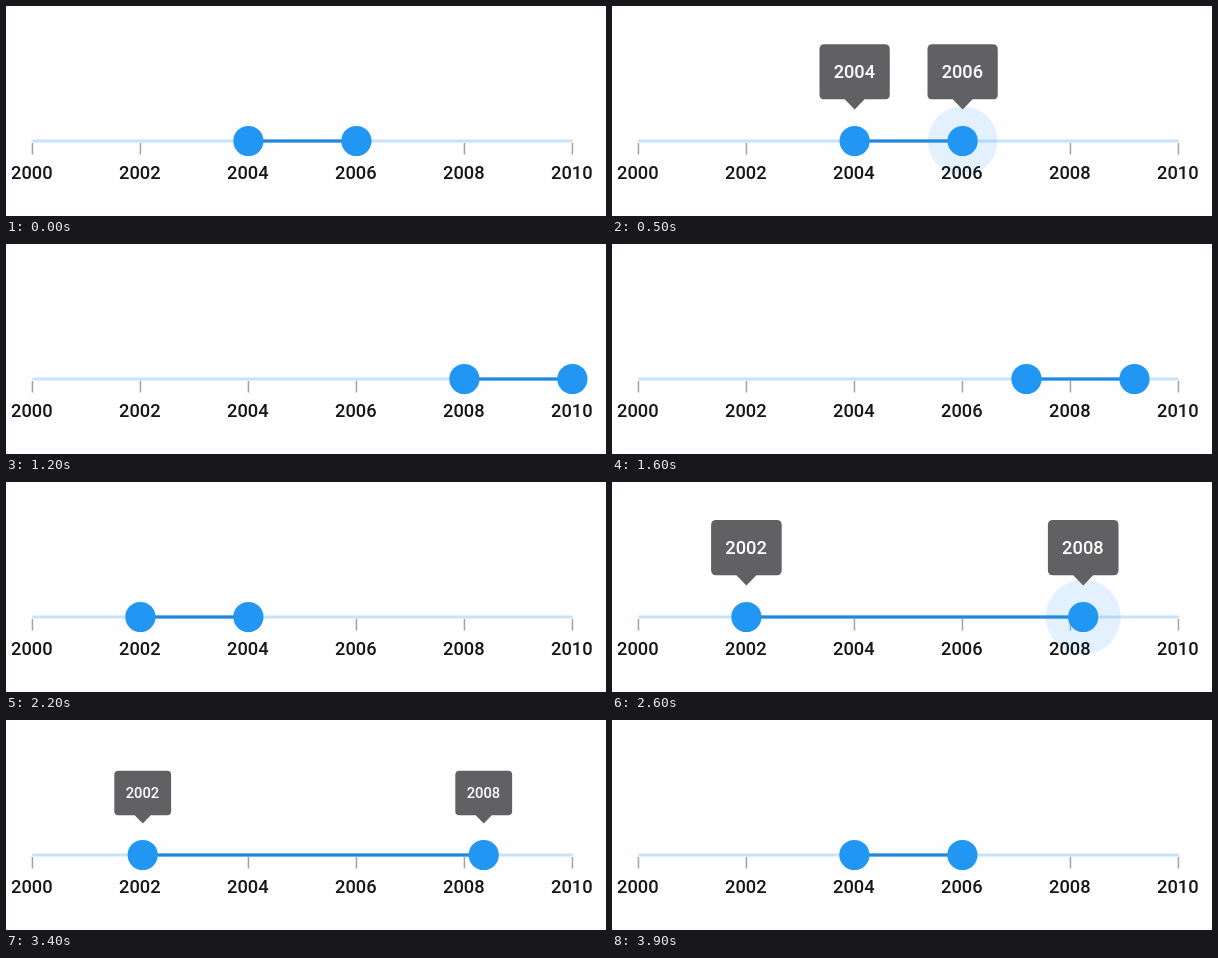
These frames come from a looping animation (600 px wide and 210 px high, 4 s). An HTML page:

```html
<!DOCTYPE html>
<html lang="en">
<head>
<meta charset="utf-8">
<title>Range slider</title>
<style>
  html, body { margin: 0; width: 100%; height: 100%; overflow: hidden; background: #fefdff; }
  svg { display: block; width: 600px; height: 210px; }
  text { font: 500 18.3px Roboto, sans-serif; text-anchor: middle; fill: #161616; }
  .tooltip path { fill: #616062; }
  .tooltip text { fill: #fff; }
  .thumb { fill: #2196f3; }
</style>
</head>
<body>
<svg viewBox="0 0 600 210">
  <rect x="26" y="133.4" width="541" height="3.2" rx="1.5" fill="#c8e3f9"/>
  <g id="scale"></g>
  <rect id="active" y="133.4" height="3.2" fill="#2089de"/>
  <circle id="halo" cy="135" fill="#2196f3" fill-opacity=".12"/>
  <g id="labels"></g>
  <g id="thumbs"></g>
  <g id="tooltips"></g>
</svg>
<script>
const LOOP = 4000, STEP = 100, FADE = 100, SNAP = 500;
const LEFT = 26.4, YEAR = 54, AXIS = 135;
const byId = id => document.getElementById(id);
const xOf = year => LEFT + (year - 2000) * YEAR;
const clamp = (v, lo = 0, hi = 1) => Math.min(hi, Math.max(lo, v));
const mix = (a, b, p) => a + (b - a) * p;

function add(parent, tag, attrs) {
  const el = document.createElementNS("http://www.w3.org/2000/svg", tag);
  set(el, attrs);
  return parent.appendChild(el);
}
function set(el, attrs) {
  for (const key in attrs) el.setAttribute(key, attrs[key]);
}

// Cubic ease-in-out with control points (.42, 0) and (.58, 1), solved by bisection.
function easeInOut(p) {
  if (p <= 0 || p >= 1) return clamp(p);
  let lo = 0, hi = 1;
  for (let i = 0; i < 24; i++) {
    const s = (lo + hi) / 2, r = 1 - s;
    if (3 * r * r * s * .42 + 3 * r * s * s * .58 + s * s * s < p) lo = s; else hi = s;
  }
  return 3 * (1 - lo) * lo * lo + lo ** 3;
}

const dragEnd = xOf(2000) + 454.1;
const snaps = [
  { at: 488, from: [xOf(2004), xOf(2006)], to: [xOf(2008), xOf(2010)] },
  { at: 1472, from: [xOf(2008), xOf(2010)], to: [xOf(2002), xOf(2004)] },
  { at: 3348, from: [xOf(2002), dragEnd], to: [xOf(2004), xOf(2006)] }
];
const presses = [
  { down: 250, up: 488, halo: true },
  { down: 1270, up: 1472 },
  { down: 2280, up: 2700, halo: true },
  { down: 3130, up: 3348 }
];
const drag = [[2400, xOf(2004)], [2500, 372], [2600, 471.2], [2700, dragEnd]];

function dragX(t) {
  for (let i = 1; i < drag.length; i++) {
    const [t0, x0] = drag[i - 1], [t1, x1] = drag[i];
    if (t < t1) return mix(x0, x1, clamp((t - t0) / (t1 - t0)));
  }
  return dragEnd;
}

function thumbsAt(t) {
  if (t >= drag[0][0] && t < snaps[2].at) return [xOf(2002), dragX(t)];
  const snap = snaps.filter(s => s.at <= t).pop() || snaps[0];
  const p = easeInOut((t - snap.at) / SNAP);
  return snap.from.map((x, i) => mix(x, snap.to[i], p));
}

const pressed = ({ down, up }, t) =>
  t < up ? clamp((t - down) / FADE) : clamp(1 - (t - up) / FADE);

for (let year = 2000; year <= 2010; year += 2) {
  const x = xOf(year);
  add(byId("scale"), "rect", { x: x - .7, y: 137, width: 1.5, height: 11.5, fill: "#a3a3a5" });
  add(byId("labels"), "text", { x: x - .6, y: 173 }).textContent = year;
}
const thumbs = [0, 1].map(() => add(byId("thumbs"), "circle", { class: "thumb", cy: AXIS, r: 15.1 }));
const tooltips = [0, 1].map(() => {
  const group = add(byId("tooltips"), "g", { class: "tooltip" });
  return { group, box: add(group, "path", {}), label: add(group, "text", { y: -31.3 }) };
});

// The tooltip's origin is the tip of its nose; the box shifts to stay inside the slider.
function drawTooltip({ group, box, label }, x, size) {
  const shift = Math.min(0, 584 - 35.3 - x);
  set(group, { transform: `translate(${x} 103.5) scale(${size})`, visibility: size ? "visible" : "hidden" });
  set(box, { d: `M0 0L-10-10.2H${shift - 30.3}q-5 0-5-5V-60.5q0-5 5-5H${shift + 30.3}q5 0 5 5V-15.2q0 5-5 5H10Z` });
  set(label, { x: shift - .3 });
  label.textContent = Math.floor(2000.05 + (x - LEFT) / YEAR);
}

function draw(t) {
  const xs = thumbsAt(t);
  const press = presses.find(p => pressed(p, t) > 0);
  const amount = press ? pressed(press, t) : 0;
  const size = 1 - (1 - amount) ** 2.5;
  set(byId("active"), { x: xs[0], width: xs[1] - xs[0] });
  set(byId("halo"), { cx: xs[1], r: press && press.halo ? mix(15, 37.4, amount) : 0 });
  xs.forEach((x, i) => {
    set(thumbs[i], { cx: x });
    drawTooltip(tooltips[i], x, size);
  });
}

const start = performance.now();
function tick() {
  const t = (performance.now() - start) % LOOP;
  draw(Math.floor(t / STEP) * STEP);
  requestAnimationFrame(tick);
}
tick();
</script>
</body>
</html>
```
